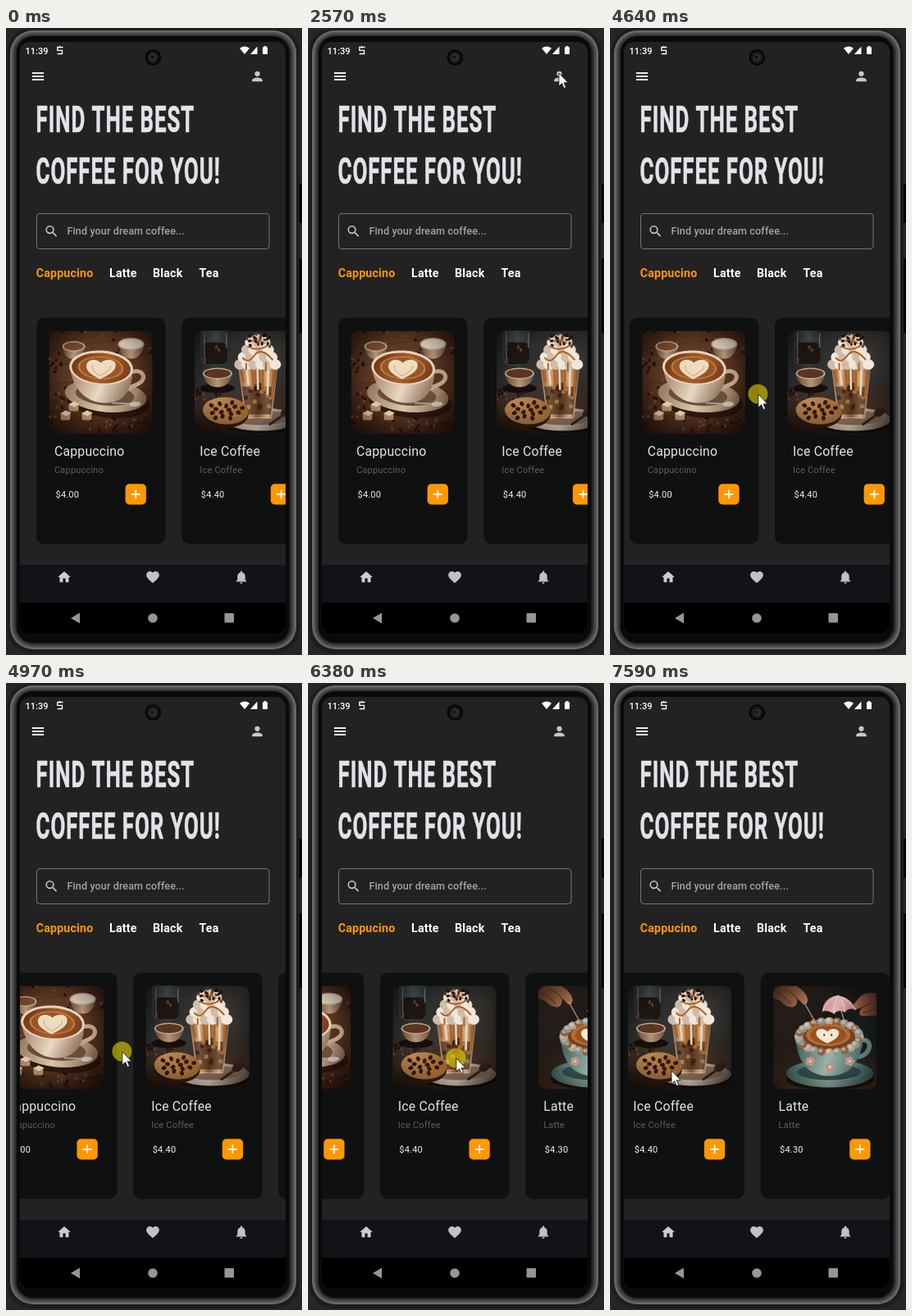
These frames come from a looping animation (361 by 765 pixels, 8000 ms). An HTML page with a canvas:

```html
<!DOCTYPE html>
<html lang="en">
<head>
<meta charset="utf-8">
<title>Coffee shop app</title>
<style>
html, body { margin: 0; width: 100%; height: 100%; overflow: hidden; background: #262626; }
canvas { display: block; width: 361px; height: 765px; }
</style>
</head>
<body>
<canvas id="stage"></canvas>
<script>
const W = 361, H = 765, LOOP = 8000;
const stage = document.getElementById('stage');
const dpr = window.devicePixelRatio || 1;
stage.width = W * dpr;
stage.height = H * dpr;
const c = stage.getContext('2d');
const TAU = Math.PI * 2;
const ORANGE = '#ff9800', CARD_W = 157.6, PITCH = 177.3;

// Motion keys: [time, x, y]
const cursorKeys = [
  [130, 334, 549], [360, 215, 430], [600, 152, 385], [740, 152, 385],
  [1150, 100, 215], [1570, 44, 62], [1710, 44, 62], [2080, 150, 25],
  [2570, 306, 55], [3330, 306, 55], [3600, 245, 190], [3900, 165, 385], [4150, 147, 442],
  [4400, 205, 446], [4640, 181, 447], [4970, 142, 450], [5200, 118, 451], [5450, 150, 454],
  [5780, 235, 458], [5920, 235, 458], [6380, 181, 458], [6860, 111, 466], [7590, 75, 473]
];
const scrollKeys = [
  [4450, 0], [4640, 13.2], [4970, 59], [5200, 81], [5500, 86], [6000, 86],
  [6380, 126.3], [6620, 168], [6860, 208.6], [7000, 208]
];
const presses = [[1640, 1780], [2640, 2780], [4400, 5220], [5980, 6790]];

// Monotone cubic through the keys, so rests stay still
function track(keys, t, k) {
  const last = keys.length - 1;
  if (t <= keys[0][0]) return keys[0][k];
  if (t >= keys[last][0]) return keys[last][k];
  let i = 0;
  while (t > keys[i + 1][0]) i++;
  const slope = j => j < 0 || j >= last ? 0 : (keys[j + 1][k] - keys[j][k]) / (keys[j + 1][0] - keys[j][0]);
  const tangent = j => {
    const a = slope(j - 1), b = slope(j);
    return a * b > 0 ? 2 * a * b / (a + b) : 0;
  };
  const d = keys[i + 1][0] - keys[i][0], u = (t - keys[i][0]) / d, v = 1 - u;
  return keys[i][k] * (1 + 2 * u) * v * v + tangent(i) * d * u * v * v +
    keys[i + 1][k] * u * u * (3 - 2 * u) - tangent(i + 1) * d * u * u * v;
}

function box(x, y, w, h, r, fill) {
  c.beginPath();
  c.roundRect(x, y, w, h, r);
  if (fill) { c.fillStyle = fill; c.fill(); }
}
function rim(color, width) {
  c.strokeStyle = color;
  c.lineWidth = width;
  c.stroke();
}
function oval(x, y, rx, ry, fill, turn = 0) {
  c.beginPath();
  c.ellipse(x, y, rx, ry, turn, 0, TAU);
  c.fillStyle = fill;
  c.fill();
}
function poly(fill, ...p) {
  c.beginPath();
  for (let i = 0; i < p.length; i += 2) c.lineTo(p[i], p[i + 1]);
  c.closePath();
  c.fillStyle = fill;
  c.fill();
}
function line(color, width, d) {
  c.strokeStyle = color;
  c.lineWidth = width;
  c.lineCap = 'round';
  c.stroke(new Path2D(d));
}
function shape(fill, d) {
  c.fillStyle = fill;
  c.fill(new Path2D(d));
}
function stops(g, colors) {
  colors.forEach((col, i) => g.addColorStop(i / (colors.length - 1), col));
  return g;
}
const ramp = (x0, y0, x1, y1, ...colors) => stops(c.createLinearGradient(x0, y0, x1, y1), colors);
const glow = (x, y, r, ...colors) => stops(c.createRadialGradient(x, y, 0, x, y, r), colors);

function text(s, x, y, size, color, weight = 400, spacing = 0.2) {
  c.font = `${weight} ${size}px Roboto, sans-serif`;
  c.letterSpacing = spacing + 'px';
  c.fillStyle = color;
  c.fillText(s, x, y);
}
function seeded(s) {
  return () => (s = s * 16807 % 2147483647) / 2147483647;
}

const icons = {
  menu: 'M3 18.3h18v-2.5H3zM3 13.2h18v-2.5H3zM3 5.7v2.5h18V5.7z',
  person: 'M12 12a4 4 0 1 0 0-8 4 4 0 0 0 0 8zm0 2c-2.67 0-8 1.34-8 4v2h16v-2c0-2.66-5.33-4-8-4z',
  search: 'M15.5 14h-.79l-.28-.27A6.47 6.47 0 0 0 16 9.5 6.5 6.5 0 1 0 9.5 16c1.61 0 3.09-.59 4.23-1.57l.27.28v.79l5 4.99L20.49 19zm-6 0a4.5 4.5 0 1 1 0-9 4.5 4.5 0 0 1 0 9z',
  home: 'M10 20v-6h4v6h5v-8h3L12 3 2 12h3v8z',
  heart: 'M12 21.35l-1.45-1.32C5.4 15.36 2 12.28 2 8.5 2 5.42 4.42 3 7.5 3c1.74 0 3.41.81 4.5 2.09C13.09 3.81 14.76 3 16.5 3 19.58 3 22 5.42 22 8.5c0 3.78-3.4 6.86-8.55 11.54z',
  bell: 'M12 22c1.1 0 2-.9 2-2h-4a2 2 0 0 0 2 2zm6-6v-5c0-3.07-1.64-5.64-4.5-6.32V4c0-.83-.67-1.5-1.5-1.5s-1.5.67-1.5 1.5v.68C7.63 5.36 6 7.92 6 11v5l-2 2v1h16v-1z'
};
function icon(name, x, y, color, size = 18.9) {
  c.save();
  c.translate(x - size / 2, y - size / 2);
  c.scale(size / 24, size / 24);
  c.fillStyle = color;
  c.fill(new Path2D(icons[name]), 'evenodd');
  c.restore();
}

// Pictures are drawn in a 126 x 126 square
function bowl(x, y, rx, ry, inside) {
  shape(ramp(x - rx, 0, x + rx, 0, '#5e4636', '#b39478', '#6b5140'), `M${x - rx} ${y}Q${x - rx * 0.8} ${y + ry * 2.4} ${x} ${y + ry * 2.4}T${x + rx} ${y}z`);
  oval(x, y, rx, ry, '#bfa588');
  oval(x, y, rx - 2, ry - 1.5, inside);
}
function beans(n, seed, x, y, w, h) {
  const rnd = seeded(seed);
  for (let i = 0; i < n; i++) {
    const bx = x + rnd() * w, by = y + rnd() * h;
    oval(bx, by, 2.2, 1.6, i % 3 ? '#25110a' : '#6b4029', rnd() * 3);
  }
}
function cappuccino() {
  c.fillStyle = glow(60, 50, 95, '#6b4630', '#54321f', '#2e180e');
  c.fillRect(0, 0, 126, 126);
  for (let y = 14; y < 126; y += 22) line('#2d170d55', 1, `M0 ${y + 8}L126 ${y - 8}`);
  beans(26, 77, 0, 0, 126, 40);
  beans(32, 913, 0, 32, 26, 90);
  beans(22, 51, 50, 104, 76, 22);
  bowl(30, 19, 14, 6.5, '#77482a');
  bowl(100, 16, 16, 7.5, '#d8cbbb');
  oval(72, 86, 51, 20, '#1a0c07aa', 0.1);
  oval(69, 79, 50, 20, ramp(18, 62, 118, 98, '#8d6f57', '#dcc5aa', '#7b5c46'), 0.1);
  oval(68, 78, 36, 13, '#6d4d37', 0.1);
  line('#bfa388', 5, 'M98 51C115 44 121 59 108 65S97 69 94 72');
  shape(ramp(27, 44, 105, 80, '#9c7d64', '#e9d8c3', '#77583f'), 'M25 43C28 68 43 88 68 88S101 70 102 48z');
  oval(63.5, 45, 39, 21, '#e6d3bc', 0.06);
  oval(63.5, 45.5, 36, 18.5, ramp(30, 28, 100, 64, '#6b3313', '#a65d2a', '#723617'), 0.06);
  oval(63, 45, 28, 14, '#b87a42', 0.06);
  oval(63, 45, 25.5, 12.5, '#9b5526', 0.06);
  shape('#eedcc0', 'M62 59C50 53 43 47 46 40C49 34 58 34 63 39C68 34 79 34 81 40C83 48 73 54 62 59z');
  line('#cf9c69', 1, 'M62 55C54 50 51 46 53 42M62 55C71 50 76 47 75 43');
  line('#a39990', 2, 'M78 88L100 89');
  oval(105, 89.5, 7, 3, '#c9c0b8', -0.1);
  const cube = (x, y) => {
    box(x, y, 12, 10, 2, '#a98769');
    poly('#dfc7aa', x, y + 2, x + 6, y - 2, x + 13, y + 1, x + 7, y + 5);
  };
  cube(24, 88); cube(14, 99); cube(40, 99);
}
function iceCoffee() {
  c.fillStyle = ramp(0, 0, 126, 126, '#202426', '#393633', '#221b17');
  c.fillRect(0, 0, 126, 126);
  c.fillStyle = ramp(0, 66, 0, 126, '#3e2c2100', '#3e2c21', '#21150f');
  c.fillRect(0, 66, 126, 60);
  box(7, -8, 36, 50, 9, ramp(7, 0, 43, 0, '#2d3335', '#4a5254', '#262b2c'));
  box(10, 14, 30, 27, 7, '#1d1815');
  line('#6b7678', 1.2, 'M12 2V32M39 3V20');
  beans(14, 313, 12, 19, 26, 20);
  beans(14, 87, 0, 72, 34, 14);
  oval(28, 70, 21, 6, '#150e0a');
  bowl(28, 52, 18, 7, '#5a3521');
  oval(80, 112, 48, 13, '#120b08cc');
  oval(81, 108, 45, 14, ramp(33, 95, 125, 120, '#8f8070', '#cbbcaa', '#6b5b4d'));
  oval(80, 106, 36, 9, '#7d6756');
  poly(ramp(53, 0, 101, 0, '#6d452b', '#d6b088', '#84502a', '#d9b78d', '#5f3b23'), 53, 42, 101, 42, 94, 107, 62, 107);
  poly('#3f2416aa', 58, 68, 97, 68, 93, 102, 63, 102);
  const rnd = seeded(42);
  for (let i = 0; i < 22; i++) box(60 + rnd() * 31, 58 + rnd() * 40, 5, 5, 1.5, i % 2 ? '#c98f54a0' : '#341a0fb0');
  for (let i = 0; i < 7; i++) line(i % 2 ? '#ead4b6' : '#b0601e', 2.6, `M${57 + i * 6.6} 46L${60 + i * 5.8} ${62 + i * 31 % 28}`);
  line('#e0cfbb77', 1, 'M54 44L62 106H94L101 44');
  for (let row = 0; row < 4; row++) {
    const n = 6 - row;
    for (let i = 0; i < n; i++) oval(77 + (i - (n - 1) / 2) * 8.6, 41 - row * 9, 7, 6.5, (i + row) % 2 ? '#f0e6da' : '#cdbcaa');
  }
  oval(78, 10, 9, 6, '#e3d5c5');
  line('#b0601c', 2, 'M65 19Q77 26 89 18M59 33Q65 41 73 30T95 35M68 13Q77 9 85 15M63 40V47M87 39V49');
  beans(22, 619, 64, 3, 28, 16);
  oval(112, 99, 8, 5, '#33221a', -0.6);
  line('#33221a', 3, 'M105 105L92 114');
  oval(38, 102, 28, 16.5, '#2c1910');
  oval(38, 97.5, 28, 16.5, ramp(12, 80, 62, 114, '#c99358', '#8f5a2c'), 0.05);
  for (let i = 0; i < 15; i++) {
    const a = i * 2.4, r = Math.sqrt((i + 0.5) / 15);
    oval(38 + Math.cos(a) * r * 22, 96.5 + Math.sin(a) * r * 12, 3, 2.4, '#301810', a);
  }
}
function latte() {
  c.fillStyle = ramp(0, 0, 126, 80, '#33271f', '#1a1716', '#161d1f');
  c.fillRect(0, 0, 126, 126);
  c.fillStyle = ramp(0, 70, 0, 126, '#40291c00', '#4a2f20');
  c.fillRect(0, 70, 126, 56);
  shape(ramp(0, 0, 44, 28, '#6b4029', '#b37a55'), 'M0 0H28Q41 8 42 17Q41 25 36 22L29 15Q30 24 24 26Q15 26 8 18L0 15z');
  line('#5e3624', 1.2, 'M13 4Q25 8 29 16M3 8Q15 13 21 22');
  shape(ramp(95, 0, 126, 0, '#a56c4b', '#5f3826'), 'M126 9Q112 7 105 14L96 25Q97 31 103 28L108 26Q102 35 108 37L126 36z');
  line('#4d2b1d', 1.2, 'M108 27L118 21M110 33L123 28');
  oval(69, 114, 54, 13, '#120c09bb');
  oval(69, 107, 53, 17, ramp(16, 100, 122, 118, '#3f5f5c', '#86a39c', '#3a5956'));
  oval(68, 105, 39, 10, '#304b48');
  line('#64857f', 5.5, 'M105 67C123 61 121 87 100 87');
  shape(ramp(27, 70, 110, 90, '#3c5c58', '#9ab3aa', '#43635f'), 'M27 62C29 91 41 110 68 110S107 91 110 62z');
  for (let i = 0; i < 3; i++) {
    const x = 45 + i * 24, y = i === 1 ? 99 : 92;
    for (let k = 0; k < 5; k++) oval(x + 3.4 * Math.cos(k * TAU / 5), y + 3.4 * Math.sin(k * TAU / 5), 2.6, 2.6, '#bd9488');
    oval(x, y, 1.8, 1.8, '#e0c8ac');
  }
  oval(68, 62, 42, 22, '#a9a294');
  oval(68, 61, 38, 20, '#75401f');
  for (let i = 0; i < 24; i++) {
    const a = i * TAU / 24, x = 68 + 37 * Math.cos(a), y = 62 + 19 * Math.sin(a);
    oval(x, y, 5.3, 4.8, ['#b5a593', '#8e6146', '#87958e'][i % 3]);
    oval(x - 1, y - 1.2, 2.6, 2.2, '#e9dccb88');
  }
  oval(67, 60, 27, 13.5, '#b26c34');
  oval(67, 60, 22, 11, '#965222');
  shape('#f6e8d4', 'M66 70C56 66 50 61 53 55C56 51 63 52 66 56C70 51 78 52 80 56C81 62 75 66 66 70z');
  oval(62, 60, 1.1, 1.4, '#6b3a1c');
  oval(71, 60, 1.1, 1.4, '#6b3a1c');
  line('#b79f88', 1.2, 'M38 21L52 46M79 18L88 48');
  shape(ramp(60, 12, 99, 32, '#c58488', '#e0b0ae', '#b06c74'), 'M60 31C60 20 69 12 79 12C89 13 98 20 100 29Q93 26 87 32Q80 28 74 34Q67 29 60 31z');
  line('#f0d3cc', 1, 'M79 12Q65 18 60 31M79 12Q73 21 74 34M79 12Q87 20 87 32M79 12Q94 18 100 29');
}

const drinks = [
  ['Cappuccino', '$4.00', cappuccino],
  ['Ice Coffee', '$4.40', iceCoffee],
  ['Latte', '$4.30', latte]
];

function card([name, price, picture], x) {
  if (x > 341 || x + CARD_W < 17) return;
  box(x, 353.5, CARD_W, 276, 9.5, '#0f1010');
  c.save();
  box(x + 15.6, 369.5, 126, 126, 9.5);
  c.clip();
  c.translate(x + 15.6, 369.5);
  picture();
  c.fillStyle = glow(63, 60, 92, '#0000', '#0000', '#0008');
  c.fillRect(0, 0, 126, 126);
  c.restore();
  text(name, x + 22, 521.7, 15.8, '#e6e1e5');
  text(name, x + 22, 542.8, 11, '#5f5d5d');
  text(price, x + 23.5, 572.8, 11, '#f2f2f2');
  box(x + 108.6, 556.2, 25.3, 25.3, 5, ORANGE);
  c.fillStyle = '#fff';
  c.fillRect(x + 115.7, 568, 11, 1.7);
  c.fillRect(x + 120.4, 563.3, 1.7, 11);
}

function phone() {
  c.fillStyle = '#262626';
  c.fillRect(0, 0, W, H);
  box(358, 190, 3, 48, 1, '#050505');
  box(358, 281, 3, 91, 1, '#050505');
  box(1, 0, 357, 763, 30, '#1d1d1d');
  // Metal edge, brightest outside and fading to the black bezel
  for (let i = 0; i < 9; i++) {
    const g = Math.round(112 - i * 11);
    box(5 + i, 3 + i, 349 - i * 2, 755 - i * 2, 28 - i, `rgb(${g},${g},${g})`);
  }
  box(13, 10, 332, 740, 20, '#0a0a0a');
}

function statusBar() {
  text('11:39', 23.5, 32, 11, '#fff', 500, 0);
  line('#fff', 1.3, 'M69 23.5H62.8V27.3H68.5V31.5H63.2M65.5 23.5V22.3');
  shape('#fff', 'M285 24.8Q291 20.2 297 24.8L291 32z');
  poly('#fff', 306.5, 22.5, 306.5, 32, 298, 32);
  box(313, 23.2, 6, 8.8, 1, '#fff');
  c.fillRect(314.6, 22, 2.8, 2);
  oval(179.3, 36, 9.8, 9.8, '#050505');
  oval(179.3, 36, 7.4, 7.4, '#191919');
  oval(179.3, 36, 4.5, 4.5, '#2d2d2f');
  oval(178.5, 35.5, 2, 2, '#111');
}

// Tall narrow headline face
function headline(s, y) {
  c.save();
  c.translate(36.6, y);
  c.scale(0.58, 1);
  text(s, 0, 0, 44.6, '#e6e0e9', 700, 1.6);
  c.lineJoin = 'miter';
  c.strokeStyle = '#e6e0e9';
  c.lineWidth = 0.7;
  c.strokeText(s, 0, 0);
  c.restore();
}

function page(scroll) {
  c.fillStyle = '#222';
  c.fillRect(17, 17, 324, 722);
  icon('menu', 39, 59, '#f1edf3');
  icon('person', 306.5, 59, '#cac4d0');
  headline('FIND THE BEST', 127);
  headline('COFFEE FOR YOU!', 190);

  box(37.5, 226.5, 283.5, 43, 3.5);
  rim('#777679', 1);
  icon('search', 55.5, 248, '#cac4d0');
  text('Find your dream coffee...', 74.5, 252.3, 12.6, '#a5a1a8', 500, 0.1);

  text('Cappucino', 36.7, 304.2, 14.2, ORANGE, 700);
  text('Latte', 126, 304.2, 14.2, '#fff', 700);
  text('Black', 179, 304.2, 14.2, '#fff', 700);
  text('Tea', 235.5, 304.2, 14.2, '#fff', 700);

  drinks.forEach((d, i) => card(d, 37 + i * PITCH - scroll));

  c.fillStyle = '#141218';
  c.fillRect(17, 655, 324, 46);
  icon('home', 71, 670, '#d0cad2');
  icon('heart', 179, 670, '#c4bfc8');
  icon('bell', 287, 670, '#c4bfc8');
  c.fillStyle = '#000';
  c.fillRect(17, 701, 324, 38);
  poly('#969696', 79, 720, 90, 713.5, 90, 726.5);
  oval(179, 720, 5.8, 5.8, '#969696');
  box(266.5, 714, 11.5, 11.5, 1, '#969696');
}

function cursor(t) {
  if (t < 130) return;
  const x = track(cursorKeys, t, 1), y = track(cursorKeys, t, 2);
  if (t >= 2780 && t < 3120) {
    const grow = Math.min(1, (t - 2780) / 140);
    oval(306.5, 58.5, 10 + 5.5 * grow, 10 + 5.5 * grow, 'rgba(230,224,233,.1)');
  }
  if (presses.some(([a, b]) => t >= a && t < b)) oval(x - 0.5, y - 0.5, 12, 12, 'rgba(255,238,0,.53)');
  c.save();
  c.translate(x, y);
  poly('#fff', 0, 0, 0, 16, 3.7, 12.6, 6.2, 18.5, 8.7, 17.5, 6.2, 11.7, 11.2, 11.7);
  c.lineJoin = 'round';
  rim('#111', 0.8);
  c.restore();
}

function draw(t) {
  c.setTransform(dpr, 0, 0, dpr, 0, 0);
  phone();
  c.save();
  box(17, 17, 324, 722, 12);
  c.clip();
  page(track(scrollKeys, t, 1));
  statusBar();
  c.restore();
  cursor(t);
}

const start = performance.now();
function tick() {
  draw((performance.now() - start) % LOOP);
  requestAnimationFrame(tick);
}
tick();
</script>
</body>
</html>
```
